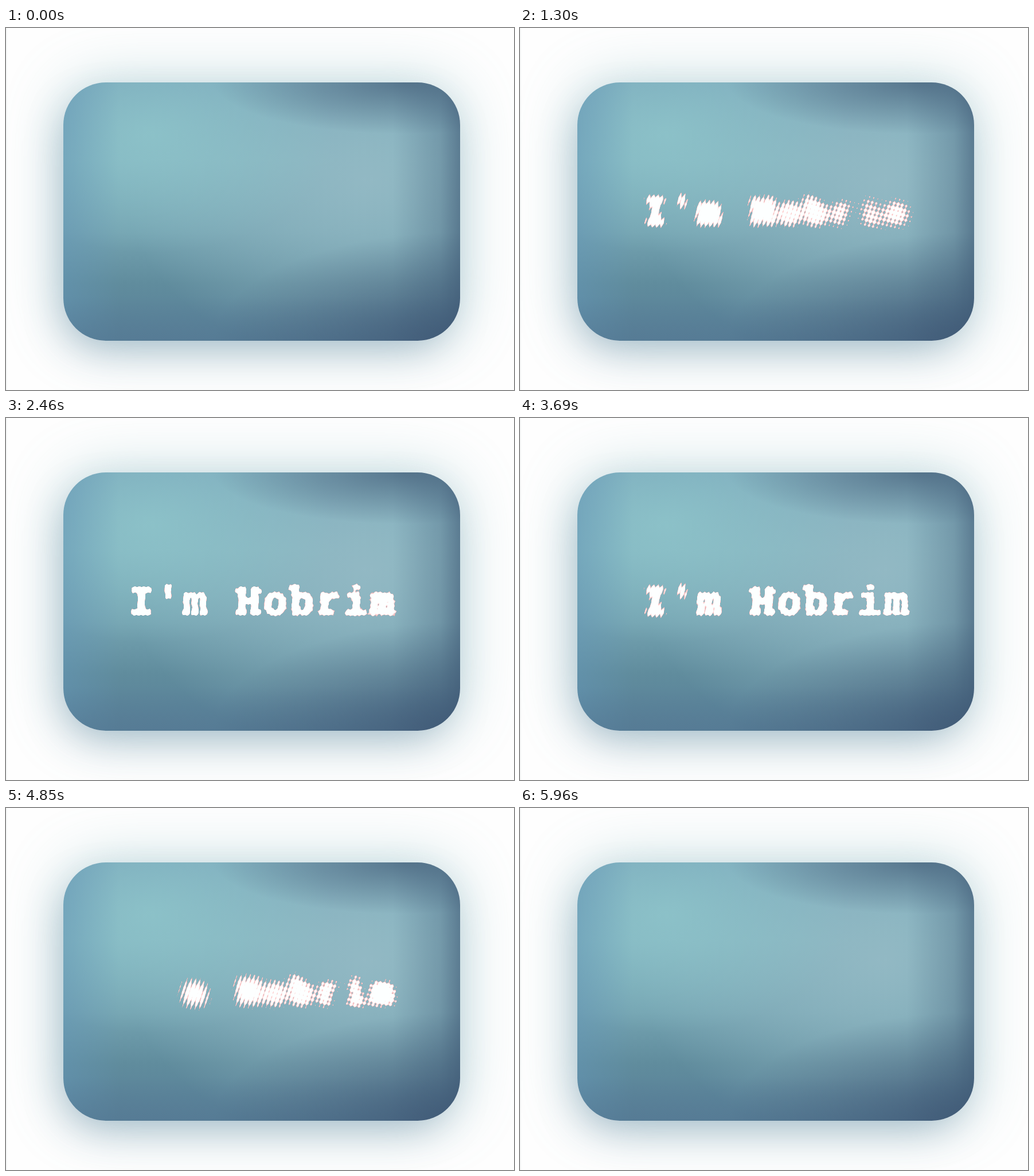
These frames come from a looping animation (886x632 px, 6.04 s). An HTML page with a canvas:

```html
<!DOCTYPE html>
<html lang="en">
<head>
<meta charset="utf-8">
<title>Halftone text</title>
<style>
  html, body { margin: 0; width: 100%; height: 100%; overflow: hidden; }
  body { position: relative; background: linear-gradient(90deg, #f5f6f6 2px, #fefefe 2px); }
  .card {
    position: absolute; left: 100px; top: 95px; width: 692px; height: 451px;
    border-radius: 74px;
    background:
      linear-gradient(270deg, rgba(62,88,116,.62), rgba(62,88,116,.3) 5%, rgba(62,88,116,0) 17%),
      radial-gradient(48% 20% at 86% 0, rgba(66,92,118,.68), rgba(66,92,118,0)),
      radial-gradient(62% 42% at 100% 100%, rgba(58,80,110,.75), rgba(58,80,110,0)),
      linear-gradient(0deg, rgba(84,120,146,.55), rgba(84,120,146,0) 17%),
      linear-gradient(90deg, rgba(100,150,182,.5), rgba(100,150,182,0) 14%),
      radial-gradient(46% 46% at 22% 20%, rgba(142,196,202,.85), rgba(142,196,202,0)),
      radial-gradient(62% 72% at 77% 38%, rgba(147,185,196,.95), rgba(147,185,196,0)),
      linear-gradient(#78a6ba, #80b2be 30%, #74a3b1 58%, #608c9d 78%, #587f98);
    box-shadow:
      0 0 100px rgba(110,175,180,.42),
      -10px 25px 70px -15px rgba(60,90,125,.38);
  }
  canvas { position: absolute; left: 190px; top: 270px; }
</style>
</head>
<body>
<div class="card"></div>
<canvas id="view" width="510" height="105"></canvas>
<script>
const LOOP = 6040, STEP = LOOP / 79;
const W = 510, H = 105, LEFT = 190, TOP = 270;
const TEXT = "I'm Hobrim", PITCH = 46.7, FIRST = 236 - LEFT, BASE = 343 - TOP;

// Slab serifs per letter: [left, right, top] from the letter's centre and baseline
const SLABS = {
  H: [[-22, -4, -45], [4, 22, -45], [-22, -4, -8], [4, 22, -8]],
  m: [[-22, -9, -8], [-6, 6, -8], [9, 22, -8]],
  b: [[-22, -8, -50]],
  r: [[-18, 8, -8]]
};

const clamp = v => Math.max(0, Math.min(1, v));
const wave = v => Math.abs((v - Math.floor(v)) * 2 - 1);

function makeCanvas(w, h) {
  const c = document.createElement('canvas');
  c.width = w;
  c.height = h;
  return c;
}

function makeGlyph(ch) {
  const c = makeCanvas(80, H), g = c.getContext('2d');
  g.translate(40, BASE);
  g.font = 'bold 70px "Liberation Mono", monospace';
  g.textAlign = 'center';
  g.lineWidth = 2;
  g.lineJoin = 'round';
  g.fillText(ch, 0, 0);
  g.strokeText(ch, 0, 0);
  for (const [a, b, y] of SLABS[ch] || []) g.fillRect(a, y, b - a, 8);
  return c;
}

const glyphs = [...TEXT].map(makeGlyph);
const field = makeCanvas(W, H).getContext('2d', { willReadFrequently: true });
const view = document.getElementById('view').getContext('2d');
const out = view.createImageData(W, H);

// Slanted strands, crossed by shallow rows that grow stronger to the right
const screen = new Float32Array(W * H);
for (let y = 0; y < H; y++) {
  for (let x = 0; x < W; x++) {
    const cross = .12 + .33 * clamp((x - 190) / 200);
    const strand = wave((x + .33 * y) / 7.7);
    const row = wave((y - .25 * x) / 8.5);
    screen[y * W + x] = .11 + .4 * (strand * (1 - cross) + row * cross);
  }
}

function drawField(t) {
  field.globalCompositeOperation = 'source-over';
  field.clearRect(0, 0, W, H);
  field.globalCompositeOperation = 'lighter';
  glyphs.forEach((glyph, i) => {
    if (TEXT[i] === ' ') return;
    const end = i < 2 ? 4980 : 5440 + 45 * i;
    const age = Math.min(t - 80 * i, end - t);
    if (age <= 0) return;
    const blur = Math.max(1.5, 29 * Math.exp(-age / 770));
    field.filter = `blur(${blur.toFixed(2)}px)`;
    field.globalAlpha = clamp(age / 600);
    field.drawImage(glyph, FIRST + i * PITCH - 40, 0);
  });
  field.filter = 'none';
  field.globalAlpha = 1;
}

function draw(t) {
  drawField(t);
  const src = field.getImageData(0, 0, W, H).data, px = out.data;
  for (let i = 0; i < screen.length; i++) {
    const k = i * 4, over = src[k + 3] / 255 - screen[i];
    const light = 162 + 93 * clamp(over / .15);
    px[k] = 253;
    px[k + 1] = px[k + 2] = light;
    px[k + 3] = 255 * clamp(over / .045);
  }
  view.putImageData(out, 0, 0);
}

const start = performance.now();
let last = -1;
function tick() {
  const n = Math.floor((performance.now() - start) % LOOP / STEP);
  if (n !== last) draw((last = n) * STEP);
  requestAnimationFrame(tick);
}
tick();
</script>
</body>
</html>
```
